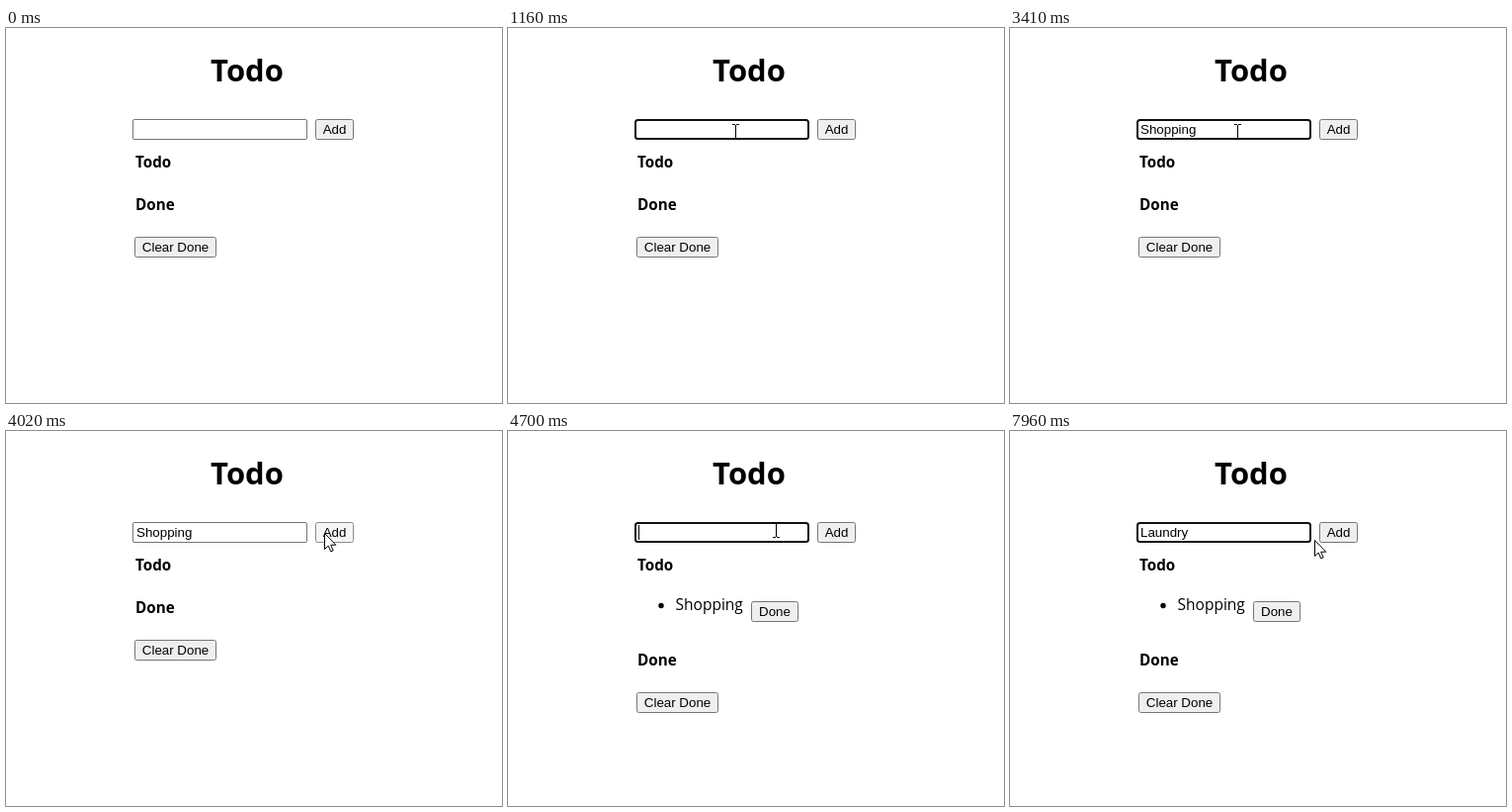
Animation, 502 px wide and 379 px high, one loop 8 s. Source, as an HTML page with a canvas:

```html
<!DOCTYPE html>
<html lang="en">
<head>
<meta charset="utf-8">
<title>Todo</title>
<style>
html, body { margin: 0; width: 100%; height: 100%; overflow: hidden; background: #fff; }
canvas { display: block; }
</style>
</head>
<body>
<canvas id="stage" width="502" height="379"></canvas>
<script>
const ctx = document.getElementById('stage').getContext('2d');
const LOOP = 8000;
const STEP = 70;
const UI = '"Open Sans", "Noto Sans", sans-serif';
const CONTROL = '13.333px "Liberation Sans", Arial, sans-serif';

// Start of each typed word, the time of every key press and when it is cleared.
const words = [
  { text: 'Shopping', focus: 630, blur: 4010, keys: [1690, 1880, 2080, 2280, 2410, 2600, 2740, 2870] },
  { text: 'Laundry', focus: 4700, blur: LOOP, keys: [5500, 6030, 6300, 6630, 6830, 7090, 7220] }
];
const ADDED = 4080;
const BLINK = 535;

// Pointer moves: start, end, from, to.
const moves = [
  { start: 70, end: 560, from: [428, 332], to: [230, 104] },
  { start: 3600, end: 3950, from: [230, 104], to: [322, 103] },
  { start: 4290, end: 4500, from: [318, 102], to: [271, 99] },
  { start: 7750, end: 7960, from: [271, 99], to: [308, 110] }
];

const ease = p => p * p * (3 - 2 * p);

function pointerAt(t) {
  const move = moves.filter(m => t >= m.start).pop();
  if (!move) return null;
  const held = Math.floor((t - move.start) / STEP) * STEP;
  const p = ease(Math.min(1, held / (move.end - move.start)));
  return move.from.map((v, i) => Math.round(v + (move.to[i] - v) * p));
}

function inside(point, x, y, w, h) {
  return point && point[0] >= x && point[0] < x + w && point[1] >= y && point[1] < y + h;
}

function text(str, x, y, font, align = 'left') {
  ctx.font = font;
  ctx.textAlign = align;
  ctx.fillStyle = '#000';
  ctx.fillText(str, x, y);
}

function box(x, y, w, h, radius, fill, stroke, line = 1) {
  ctx.beginPath();
  ctx.roundRect(x + line / 2, y + line / 2, w - line, h - line, radius);
  ctx.fillStyle = fill;
  ctx.fill();
  ctx.strokeStyle = stroke;
  ctx.lineWidth = line;
  ctx.stroke();
}

function button(label, x, y, w, fill = '#efefef', stroke = '#767676') {
  box(x, y, w, 21, 2, fill, stroke);
  text(label, x + w / 2, y + 15, CONTROL, 'center');
}

function drawInput(t, pointer) {
  const word = words.find(w => t >= w.focus && t < w.blur);
  const hover = inside(pointer, 128, 92, 177, 21);
  if (word) box(128, 92, 177, 21, 2.5, '#fff', '#101010', 2);
  else box(128, 92, 177, 21, 1.5, '#fff', hover ? '#4f4f4f' : '#767676');

  // The typed word stays in the field until the item is added.
  const shown = word || (t >= words[0].blur && t < ADDED ? words[0] : null);
  if (!shown) return;
  const pressed = shown.keys.filter(k => t >= k);
  const typed = shown.text.slice(0, pressed.length);
  text(typed, 132, 107, CONTROL);
  const since = t - (pressed.length ? pressed[pressed.length - 1] : shown.focus);
  if (word && Math.floor((since + 5) / BLINK) % 2 === 0) {
    ctx.fillRect(Math.floor(132 + ctx.measureText(typed).width), 95, 1, 15);
  }
}

function drawAdd(t, pointer) {
  const hover = inside(pointer, 313, 92, 39, 21);
  const pressed = t >= words[0].blur && t < ADDED;
  if (pressed) button('Add', 313, 92, 39, '#f5f5f5', '#8d8d8d');
  else if (hover) button('Add', 313, 92, 39, '#e5e5e5', '#4f4f4f');
  else button('Add', 313, 92, 39);
}

function drawArrow(x, y) {
  const outline = [[0, 0], [0, 16], [3.7, 12.6], [6.3, 18.4], [8.7, 17.3], [6.2, 11.7], [11.3, 11.7]];
  ctx.beginPath();
  outline.forEach(([dx, dy]) => ctx.lineTo(x + 0.5 + dx, y + 0.5 + dy));
  ctx.closePath();
  ctx.fillStyle = '#fff';
  ctx.fill();
  ctx.strokeStyle = '#000';
  ctx.lineWidth = 1;
  ctx.stroke();
}

function drawBeam(x, y) {
  ctx.fillStyle = '#000';
  ctx.fillRect(x, y - 6, 1, 14);
  for (const row of [y - 7, y + 8]) {
    ctx.fillRect(x - 3, row, 3, 1);
    ctx.fillRect(x + 1, row, 3, 1);
  }
}

function draw(t) {
  const pointer = pointerAt(t);
  const added = t >= ADDED;
  const shift = added ? 53 : 0;
  ctx.fillStyle = '#fff';
  ctx.fillRect(0, 0, 502, 379);

  text('Todo', 244, 54, `bold 31px ${UI}`, 'center');
  drawInput(t, pointer);
  drawAdd(t, pointer);
  text('Todo', 131, 141, `bold 15.2px ${UI}`);

  if (added) {
    ctx.beginPath();
    ctx.arc(155, 176.5, 2.7, 0, Math.PI * 2);
    ctx.fill();
    text('Shopping', 169.5, 181, `15.5px ${UI}`);
    button('Done', 246, 172, 48);
  }

  text('Done', 131, 184 + shift, `bold 15.2px ${UI}`);
  button('Clear Done', 130, 211 + shift, 83);

  if (pointer) {
    const cursor = inside(pointer, 128, 92, 177, 21) ? drawBeam : drawArrow;
    cursor(...pointer);
  }
}

const began = performance.now();
function frame() {
  draw((performance.now() - began) % LOOP);
  requestAnimationFrame(frame);
}
frame();
</script>
</body>
</html>
```
